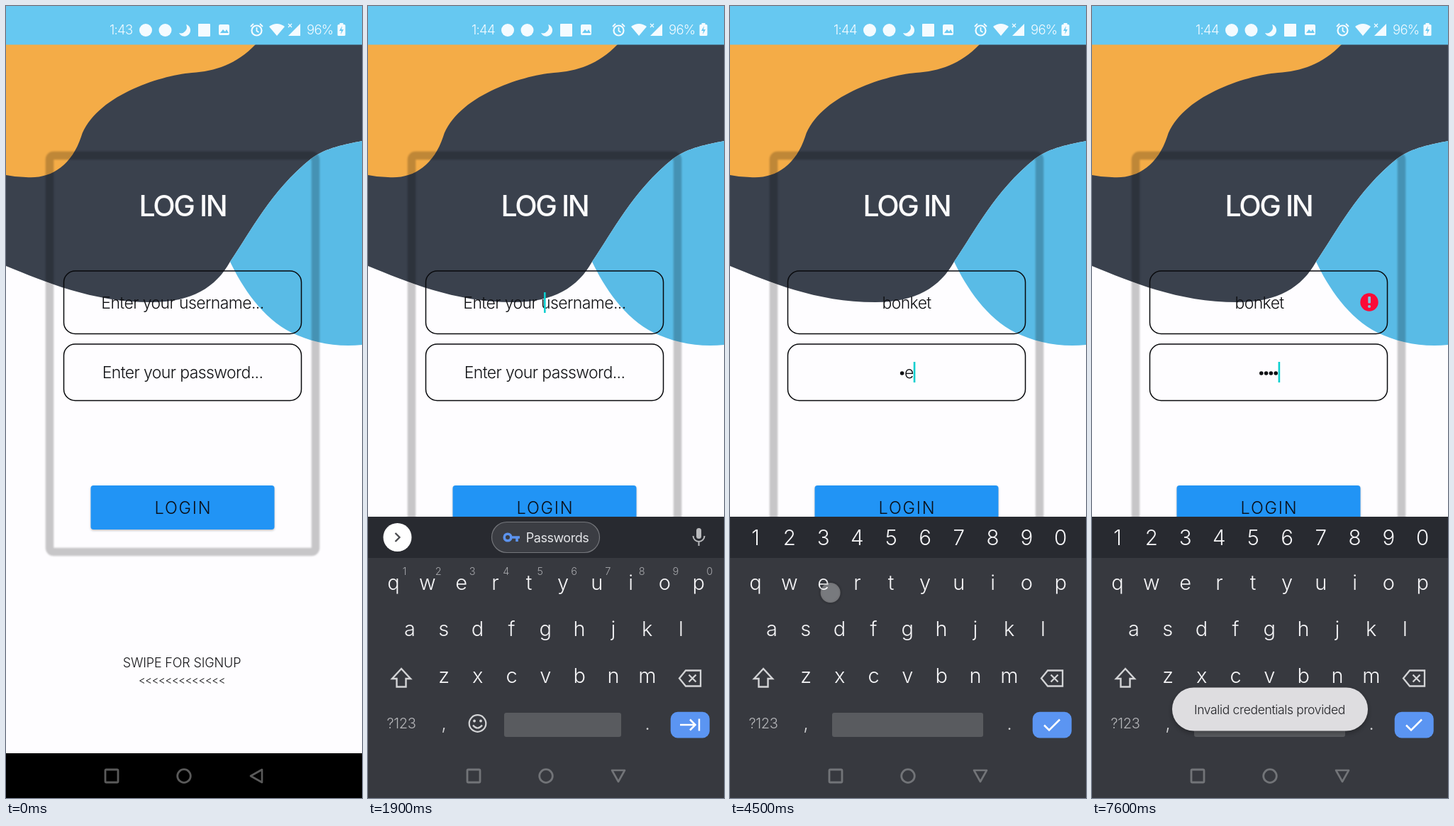
These frames come from a looping animation (502x1115 px, 8000 ms). An HTML page with a canvas:

```html
<!DOCTYPE html>
<html lang="en">
<head>
<meta charset="utf-8">
<title>Login screen</title>
<style>
  html, body { margin: 0; width: 100%; height: 100%; overflow: hidden; background: #fefdff; }
  canvas { display: block; }
</style>
</head>
<body>
<canvas id="stage" width="502" height="1115"></canvas>
<script>
const screen2d = document.getElementById('stage').getContext('2d');
const layer = document.createElement('canvas');
layer.width = 502;
layer.height = 1115;
const layer2d = layer.getContext('2d');
let ctx = screen2d;

const LOOP = 8000, STEP = 100;
const FONT = 'Inter, "Liberation Sans", sans-serif';
const USER = 'bonket', PASS = 'hello';
const USER_TIMES = [2400, 2600, 2800, 2900, 3100, 3200];
const PASS_TIMES = [4200, 4400, 4700, 4900, 5100];
const KEYS_IN = 880, TOOLS_END = 1600, NEXT = 3700, ERASE = 6600, REJECT = 7200;
const ROWS = [['qwertyuiop', 36, 822], ['asdfghjkl', 59, 887], ['zxcvbnm', 107, 953]];
const PITCH = 47.8;
const INK = '#101114';
const clamp = v => Math.max(0, Math.min(1, v));

// Times at which the blinking cursor restarts
const EDITS = [900, ...USER_TIMES, NEXT, ...PASS_TIMES, ERASE];

function keyAt(ch) {
  for (const [row, x, y] of ROWS) {
    const i = row.indexOf(ch);
    if (i >= 0) return [x + i * PITCH + 10, y + 4];
  }
}
const typed = (word, times) => times.map((t, i) => [t, ...keyAt(word[i])]);
const TAPS = [
  [800, 317, 416], ...typed(USER, USER_TIMES), [3600, 456, 1012],
  ...typed(PASS, PASS_TIMES), [6500, 458, 948], [6900, 456, 1012]
];

function text(str, x, y, size, color, { weight = 350, gap = 0, align = 'center' } = {}) {
  ctx.font = `${weight} ${size}px ${FONT}`;
  ctx.letterSpacing = gap + 'px';
  ctx.textAlign = align;
  ctx.fillStyle = color;
  ctx.fillText(str, x, y);
}
function fill(d, color) {
  ctx.fillStyle = color;
  ctx.fill(new Path2D(d));
}
function stroke(d, color, width) {
  ctx.strokeStyle = color;
  ctx.lineWidth = width;
  ctx.stroke(new Path2D(d));
}
function disc(x, y, r, color) {
  ctx.beginPath();
  ctx.arc(x, y, r, 0, 7);
  ctx.fillStyle = color;
  ctx.fill();
}
function ring(x, y, r, color, width) {
  ctx.beginPath();
  ctx.arc(x, y, r, 0, 7);
  ctx.strokeStyle = color;
  ctx.lineWidth = width;
  ctx.stroke();
}
function box(x, y, w, h, r, color, line) {
  ctx.beginPath();
  ctx.roundRect(x, y, w, h, r);
  if (line) {
    ctx.strokeStyle = color;
    ctx.lineWidth = line;
    ctx.stroke();
  } else {
    ctx.fillStyle = color;
    ctx.fill();
  }
}
function at(x, y, draw) {
  ctx.save();
  ctx.translate(x, y);
  draw();
  ctx.restore();
}

function backdrop() {
  ctx.fillStyle = '#fefdff';
  ctx.fillRect(0, 0, 502, 1115);
  fill('M0 54H502V190C478 195 452 199 430 215C373 261 345 318 316 360C296 396 262 417 205 417C120 417 55 388 0 366Z', '#3a414d');
  fill('M502 190C478 195 452 199 430 215C373 261 345 318 316 360C333 396 362 440 403 460C430 473 465 481 502 477Z', '#59bbe6');
  fill('M0 54H352C325 82 295 92 262 94C215 98 125 128 106 184C92 226 62 244 28 241Q14 241 0 238Z', '#f4ac47');
}

function statusBar(t) {
  const w = '#f4fbff', bg = '#66c8f1', thin = { weight: 300, gap: -.7, align: 'left' };
  ctx.fillStyle = bg;
  ctx.fillRect(0, 0, 502, 54.5);
  text(t < TOOLS_END ? '1:43' : '1:44', 146, 40, 18.5, w, thin);
  disc(197, 34, 9, w);
  disc(224.5, 34, 9, w);
  fill('M254 26A8.5 8.5 0 1 1 244 38A8.5 8.5 0 0 0 254 26Z', w);
  box(271, 25, 17, 18, 1, w);
  box(300, 26, 15, 15, 2, w);
  fill('M302 38l4-5 3 3 2-3 3 5z', bg);
  ring(353.5, 34.5, 7, w, 2.2);
  stroke('M353.5 30v5l3 2M345 29l4-4M362 29l-4-4', w, 1.8);
  fill('M371 29Q382 21 393 29L382 42Z', w);
  fill('M398 42L415 25V42Z', w);
  stroke('M398 25l5 5M403 25l-5 5', w, 1.2);
  text('96%', 424, 40, 18.5, w, thin);
  box(467.5, 26, 11, 16, 1.5, w);
  box(470.5, 24, 5, 3, 0, w);
  fill('M474 28l-4 7h3l-1 5 4-7h-3z', bg);
}

function cursor(x, y, t) {
  const last = EDITS.filter(e => e <= t).pop();
  if (last === undefined || (t - last) % 1000 >= 500) return;
  ctx.fillStyle = '#0ccfcf';
  ctx.fillRect(x - 1, y, 2.6, 29);
}

function userField(t) {
  box(81.5, 373, 335, 88.5, 16, '#08090c', 1.5);
  const n = USER_TIMES.filter(k => k <= t).length, opt = { gap: -.6 };
  const x = t < REJECT ? 249 : 236;
  if (!n) {
    text('Enter your username...', 249, 426, 23, INK, opt);
    if (t >= 900) cursor(249, 403, t);
    return;
  }
  const str = USER.slice(0, n);
  text(str, x, 426, 23, INK, opt);
  if (t < NEXT) {
    const half = ctx.measureText(str).width / 2;
    ctx.fillRect(x - half, 428, half * 2, 1.3);
    cursor(x + half, 403, t);
  }
  if (t >= REJECT) {
    disc(391, 417, 12.7, '#fb0b38');
    box(389.2, 409, 3.8, 9.5, 1, '#7fc3e0');
    disc(391, 423, 2.1, '#7fc3e0');
  }
}

function passField(t) {
  box(81.5, 476, 335, 79.5, 16, '#08090c', 1.5);
  const count = PASS_TIMES.filter(k => k <= t).length;
  if (!count) {
    text('Enter your password...', 249, 524, 23, INK, { gap: -.6 });
    if (t >= NEXT) cursor(249, 501, t);
    return;
  }
  const erased = t >= ERASE;
  const shown = !erased && t - PASS_TIMES[count - 1] < 1500 ? PASS[count - 1] : '';
  const dots = count - (erased || shown ? 1 : 0);
  ctx.font = `350 23px ${FONT}`;
  ctx.letterSpacing = '-0.6px';
  const width = dots * 6.8 + ctx.measureText(shown).width;
  const x = 249 - width / 2;
  for (let i = 0; i < dots; i++) disc(x + 3.4 + i * 6.8, 517, 2.8, INK);
  text(shown, x + dots * 6.8, 524, 23, INK, { gap: -.6, align: 'left' });
  cursor(x + width + 1, 501, t);
}

function form(t) {
  ctx.filter = 'blur(1px)';
  box(61.5, 210.5, 375, 558, 5.5, 'rgba(0,0,0,.215)', 11.5);
  ctx.filter = 'none';
  text('LOG IN', 249, 295.5, 41, '#fbfbfc', { weight: 450, gap: -2.4 });
  userField(t);
  passField(t);
  ctx.save();
  ctx.shadowColor = 'rgba(0,0,0,.25)';
  ctx.shadowBlur = 3;
  ctx.shadowOffsetY = 1.5;
  box(119.5, 675, 259, 62, 4, '#2194f5');
  ctx.restore();
  text('LOGIN', 250, 715, 23.5, '#0a0f18', { gap: 1.8 });
  text('SWIPE FOR SIGNUP', 248, 931, 18, '#151518', { gap: -.15 });
  text('<'.repeat(13), 248, 955, 15, '#151518', { gap: -.4 });
}

function mic() {
  const c = '#b9babd';
  box(463, 735, 7, 15, 3.5, c);
  stroke('M458.5 746a8 8 0 0 0 16 0M466.5 754v6', c, 2);
}

function chevron(dir) {
  disc(41.5, 748, 20, '#fff');
  at(41.5, 748, () => stroke(`M${-3 * dir} -6L${3 * dir} 0L${-3 * dir} 6`, '#4b4c50', 2.3));
}

function tools() {
  const c = '#b9babd';
  chevron(-1);
  stroke('M94 738h21v13l-7 7h-14zM115 751h-7v7M99 750q4 5 9 0', c, 2.2);
  disc(100.5, 744.5, 1.6, c);
  disc(108.5, 744.5, 1.6, c);
  text('GIF', 173, 754, 17, c, { weight: 700 });
  stroke('M233 738h18v20h-18zM237 746h10M237 750h10M237 754h6', c, 2);
  box(238, 735, 8, 6, 1, c);
  at(311, 748, () => {
    ring(0, 0, 6, c, 5);
    for (let i = 0; i < 6; i++) {
      ctx.rotate(Math.PI / 3);
      box(-2.5, -11, 5, 5, 1, c);
    }
  });
  stroke('M354.5 734v28', '#4a4b50', 1);
  for (const x of [389, 397, 405]) disc(x, 748, 2.2, c);
  mic();
}

function passwordChip() {
  chevron(1);
  box(174.5, 726.5, 152, 43, 21.5, '#3b3d43');
  box(174.5, 726.5, 152, 43, 21.5, '#74767b', 1.2);
  ring(197, 748, 4.8, '#5c93ee', 3.6);
  stroke('M202 748h12M210 748v6', '#5c93ee', 3.6);
  text('Passwords', 267, 754.5, 18, '#e4e5e8', { weight: 400, gap: -.5 });
  mic();
}

function suggestions(t) {
  const c = '#c6c7ca', n = USER_TIMES.filter(k => k <= t).length;
  chevron(1);
  text(USER.slice(0, n), 118, 756, 22, c);
  text(USER + 'ivo', 249, 737, 18, c, { gap: -.4 });
  text('@post.test', 249, 757, 16, c, { gap: -.3 });
  stroke('M180.5 733v30M319.5 733v30', '#45464c', 1);
  mic();
}

function letters(numeric) {
  const c = '#f5f5f7';
  ROWS.forEach(([row, x, y], r) => [...row].forEach((ch, i) => {
    text(ch, x + i * PITCH, y, 29, c);
    if (r) return;
    const digit = String((i + 1) % 10);
    if (numeric) text(digit, x + i * PITCH, 759, 29.5, c);
    else text(digit, x + 15.5 + i * PITCH, 801, 14.5, '#a6a7ab');
  }));
}

function keys(t) {
  const numeric = t >= NEXT, c = '#d3d4d6';
  ctx.fillStyle = '#282a30';
  ctx.fillRect(0, 719, 502, 58);
  ctx.fillStyle = '#37393f';
  ctx.fillRect(0, 777, 502, 338);

  if (t < TOOLS_END) tools();
  else if (t < USER_TIMES[0]) passwordChip();
  else if (!numeric) suggestions(t);
  letters(numeric);

  stroke('M47 933L34 947H40.5V958.5H53.5V947H60Z', c, 2.4);
  stroke('M448 935.5H469V957.5H448L439 946.5ZM452.5 941.5l10 10M462.5 941.5l-10 10', c, 2.3);
  text('?123', 47, 1017, 20, '#b4b5b8', { gap: -.3 });
  text(',', 107, 1019, 27, c);
  text('.', 394, 1019, 27, c);
  const left = numeric ? 144 : 192;
  box(left, 995, 357 - left, 34, 3, '#595b5f');
  if (!numeric) {
    ring(154.5, 1010, 11.8, c, 2.2);
    disc(150, 1006.5, 1.9, c);
    disc(159, 1006.5, 1.9, c);
    stroke('M148 1012.5q6.5 8 13 0', c, 2.2);
  }
  box(426.7, 993.7, 55, 36.8, 10, '#5b95f2');
  stroke(numeric ? 'M443 1012.5l7 7 15-15' : 'M440 1012H461M454 1004.5l7.5 7.5-7.5 7.5M467 1003.5v17', '#fff', 2.5);
}

// Drawn on its own layer so that the sliding keyboard fades in as one sheet
function keyboard(t) {
  const p = clamp((t - KEYS_IN) / 375);
  if (!p) return;
  ctx = layer2d;
  ctx.clearRect(0, 0, 502, 1115);
  keys(t);
  ctx = screen2d;
  ctx.globalAlpha = Math.min(1, p * 2);
  ctx.drawImage(layer, 0, Math.round(396 * (1 - p) ** 3));
  ctx.globalAlpha = 1;
}

function navBar(t) {
  ctx.fillStyle = '#000';
  ctx.fillRect(0, 1052, 502, 63);
  keyboard(t);
  const up = t >= 900, c = up ? '#727478' : '#5a5a5a';
  box(140, 1075, 18, 18, 1.5, c, 2.8);
  ring(251, 1084, 9.3, c, 2.8);
  at(353, 1084, () => {
    if (up) ctx.rotate(-Math.PI / 2);
    ctx.lineJoin = 'round';
    stroke('M-8 0L8 -9V9Z', c, 2.6);
  });
}

function toast(t) {
  const a = clamp((t - REJECT) / 400);
  if (!a) return;
  ctx.save();
  ctx.globalAlpha = a;
  ctx.shadowColor = 'rgba(0,0,0,.3)';
  ctx.shadowBlur = 7;
  ctx.shadowOffsetY = 3;
  box(113, 959.5, 276, 61, 30.5, '#dedde0');
  ctx.shadowColor = 'transparent';
  text('Invalid credentials provided', 250.5, 996.5, 17.5, '#202125', { gap: -.35 });
  ctx.restore();
}

function touches(t) {
  for (const [start, x, y] of TAPS) {
    const age = t - start;
    if (age < 0 || age >= 300) continue;
    const a = age <= 100 ? 1 : 1 - (age - 100) / 200;
    const rim = ctx.createRadialGradient(x, y, 11, x, y, 18);
    rim.addColorStop(0, 'rgba(0,0,0,0)');
    rim.addColorStop(.35, `rgba(0,0,0,${.16 * a})`);
    rim.addColorStop(1, 'rgba(0,0,0,0)');
    disc(x, y, 18, rim);
    disc(x, y, 14, `rgba(255,255,255,${.33 * a ** 1.5})`);
  }
}

function render(now) {
  const t = Math.floor((now % LOOP) / STEP) * STEP;
  backdrop();
  statusBar(t);
  form(t);
  navBar(t);
  toast(t);
  touches(t);
}

let origin;
function tick(now) {
  origin ??= now;
  render(now - origin);
  requestAnimationFrame(tick);
}
requestAnimationFrame(tick);
</script>
</body>
</html>
```
